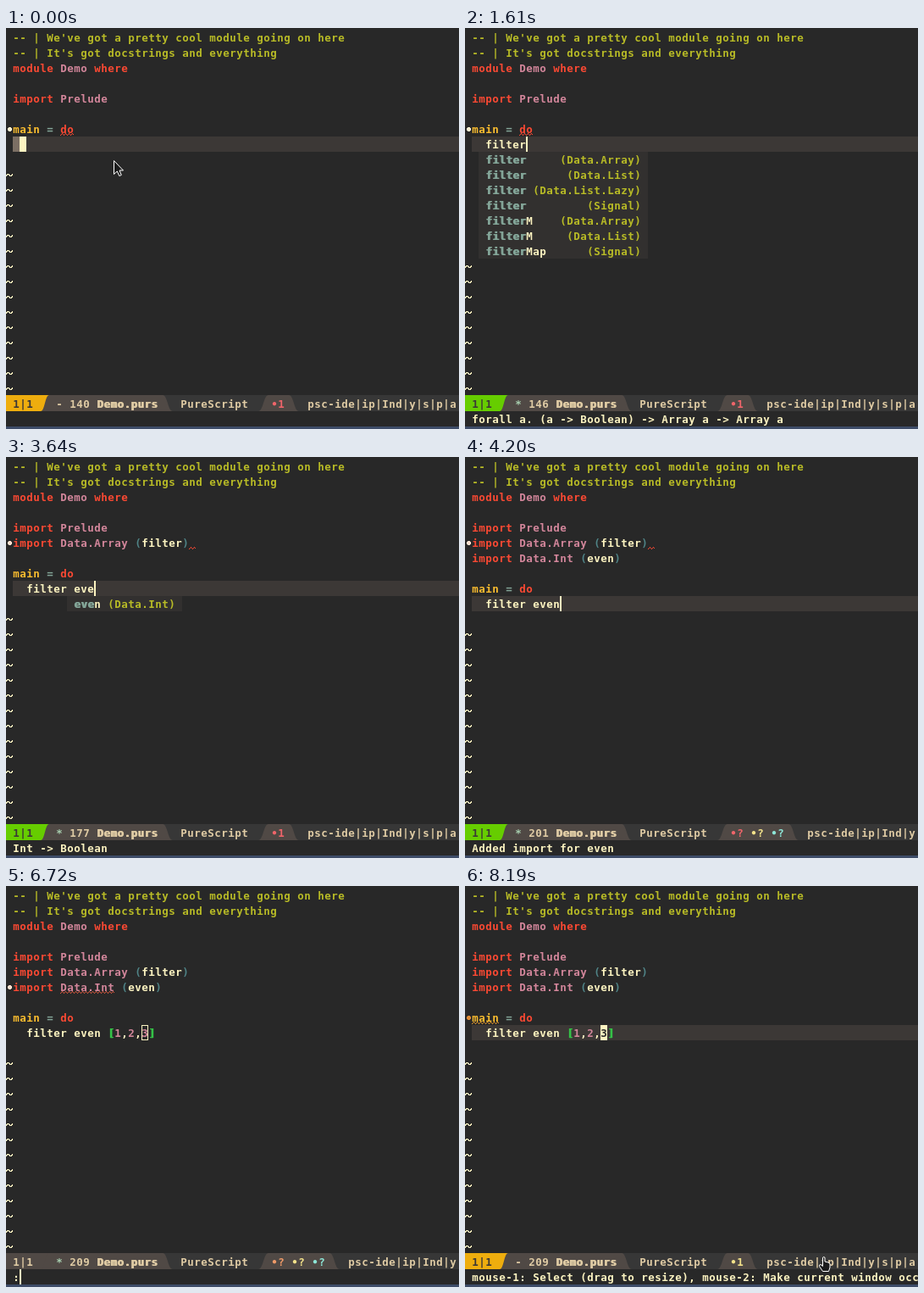
Animation of 535 by 473 pixels, one loop 8.26 s. Source, as an HTML page with a canvas:

```html
<!DOCTYPE html>
<html lang="en">
<head>
<meta charset="utf-8">
<title>Editor import completion</title>
<style>
  html, body { margin: 0; width: 100%; height: 100%; overflow: hidden; background: #282828; }
  canvas { display: block; }
</style>
</head>
<body>
<canvas id="stage" width="535" height="473"></canvas>
<script>
const ctx = document.getElementById('stage').getContext('2d');
const WIDTH = 535, HEIGHT = 473, LOOP = 8260;
const CELL = 8, LINE = 18, TOP = 2, CODE_X = 24;
const MODE_Y = 434, ECHO_Y = 452;

const C = {
  bg: '#282828', line: '#3c3836', popup: '#32302f', bar: '#373737', segment: '#504945',
  cream: '#fdf4c1', comment: '#b8bb26', keyword: '#fb4933', type: '#d3869b',
  name: '#fabd2f', operator: '#83a598', paren: '#4f8386', tan: '#dfcba4',
  trailing: '#7c6f64', error: '#f0656a', alert: '#ee9a68', warning: '#f3e28a', info: '#8de6d7',
  normal: '#eead0e', insert: '#66cd00', inactive: '#504945', strip: '#3d4c68'
};

const importLines = [
  [['import ', C.keyword], ['Data.Array ', C.type], ['(', C.paren], ['filter', C.cream], [')', C.paren]],
  [['import ', C.keyword], ['Data.Int ', C.type], ['(', C.paren], ['even', C.cream], [')', C.paren]]
];
const lineLength = line => line.reduce((sum, [text]) => sum + text.length, 1);

const filterPopup = {
  column: 0, prefix: 'filter', width: 23,
  items: [['', 'Data.Array'], ['', 'Data.List'], ['', 'Data.List.Lazy'], ['', 'Signal'],
          ['M', 'Data.Array'], ['M', 'Data.List'], ['Map', 'Signal']]
};
const evenPopup = { column: 7, prefix: 'eve', width: 15, items: [['n', 'Data.Int']] };

// Each entry changes part of the editor state from its time on.
const type = (typed, at = typed.length) => ({ typed, at });
const timeline = [
  [0, { ...type('', -1), mode: 'normal', modified: false, echo: '', issue: 'do', checkColor: C.error,
        checking: false, imports: 0, popup: null, lit: false, prompt: false }],
  [350, { mode: 'insert', at: 0, echo: '-- INSERT --' }],
  [910, { ...type('f'), modified: true, echo: '' }],
  [1050, type('fi')],
  [1260, type('filt')],
  [1610, { ...type('filter'), popup: filterPopup, echo: 'forall a. (a -> Boolean) -> Array a -> Array a' }],
  [2030, { imports: 1, popup: null, checking: true, echo: 'Added import for filter' }],
  [2450, { checking: false, issue: 'filter' }],
  [2590, { ...type('filter '), echo: '' }],
  [2730, type('filter e')],
  [3150, type('filter ev')],
  [3290, type('filter eve')],
  [3640, { popup: evenPopup, echo: 'Int -> Boolean' }],
  [3710, { checking: true }],
  [4130, { ...type('filter even'), imports: 2, popup: null, echo: 'Added import for even' }],
  [4620, { checking: false, issue: 'int', echo: '' }],
  [5040, { ...type('filter even []', 13), lit: true }],
  [5180, type('filter even [1]', 14)],
  [5390, type('filter even [1,]', 15)],
  [5530, type('filter even [1,2]', 16)],
  [5810, type('filter even [1,2,]', 17)],
  [5880, type('filter even [1,2,3]', 18)],
  [6300, { mode: 'normal', at: 17 }],
  [6370, { checking: true, checkColor: C.alert }],
  [6580, { lit: false }],
  [6720, { prompt: true, echo: ':' }],
  [6860, { echo: ':w' }],
  [6930, { prompt: false, echo: '' }],
  [7000, { modified: false, echo: 'Wrote /home/quill/Documents/chromacannon/src/Demo.purs' }],
  [7700, { checking: false, issue: 'main' }],
  [8190, { echo: 'mouse-1: Select (drag to resize), mouse-2: Make current window occupy' }]
];
const stateAt = time => Object.assign({}, ...timeline.filter(([start]) => start <= time).map(([, change]) => change));

const rowY = row => TOP + row * LINE;

function rect(x, y, w, h, color) {
  ctx.fillStyle = color;
  ctx.fillRect(x, y, w, h);
}

ctx.font = 'bold 12.5px "DejaVu Sans Mono", monospace';
const spacing = CELL - ctx.measureText('0').width;
ctx.letterSpacing = `${spacing}px`;

function write(text, x, y, color) {
  ctx.fillStyle = color;
  ctx.fillText(text, x + spacing / 2, y + 14);
}

// Heavy text is struck twice, one pixel apart.
function overstrike(text, x, y, color) {
  write(text, x, y, color);
  write(text, x + 1, y, color);
}

function writeTokens(tokens, x, y) {
  for (const [text, color] of tokens) {
    write(text, x, y, color);
    x += text.length * CELL;
  }
}

function drawTilde(row) {
  [0x71, 0xdb, 0x8e].forEach((bits, dy) => {
    for (let x = 0; x < 8; x++) {
      if (bits & (128 >> x)) rect(x, rowY(row) + 8 + dy, 1, 1, C.cream);
    }
  });
}

function drawIssue({ issue, imports }) {
  const mainRow = 6 + imports;
  const [row, x, width, dot, color] = {
    do: [mainRow, 64, 16, '#fdf0d0', C.keyword],
    filter: [5, 216, 8, '#fcdfce', C.keyword],
    int: [6, 64, 64, '#fcdfce', '#d9573d'],
    main: [mainRow, 8, 32, '#dd8a35', '#e79a2b']
  }[issue];
  const y = rowY(row);
  rect(3, y + 7, 3, 5, dot);
  rect(2, y + 8, 5, 3, dot);
  for (let dx = 0; dx < width; dx++) rect(x + dx, y + 14 + Math.abs(2 - dx % 4), 1, 1, color);
}

function drawPopup({ column, prefix, width, items }, row) {
  const x = CODE_X + column * CELL;
  rect(x - CELL, rowY(row), (width + 2) * CELL, items.length * LINE, C.popup);
  items.forEach(([rest, module], i) => {
    const y = rowY(row + i), note = `(${module})`;
    overstrike(prefix, x, y, C.operator);
    write(rest, x + prefix.length * CELL, y, C.cream);
    write(note, x + (width - note.length) * CELL, y, C.comment);
  });
}

function drawCodeLine(state, y) {
  const x = CODE_X + state.at * CELL;
  const block = state.mode === 'normal';
  if (!state.prompt) rect(8, y, WIDTH - 8, LINE, C.line);
  if (block && !state.typed) rect(8, y, CELL, LINE, C.trailing);
  if (block && !state.prompt) rect(x, y, CELL, LINE, C.cream);
  [...state.typed].forEach((char, i) => {
    const charX = CODE_X + i * CELL;
    if ('[]'.includes(char)) {
      if (state.lit) rect(charX, y, CELL, LINE, '#5c5a50');
      overstrike(char, charX, y, state.lit ? '#14d986' : '#35c247');
      return;
    }
    const underCursor = block && !state.prompt && i === state.at;
    const color = /\d/.test(char) ? C.type : C.cream;
    write(char, charX, y, underCursor ? C.bg : color);
  });
  if (!block) rect(x, y, 2, LINE, C.cream);
  if (state.prompt) {
    ctx.strokeStyle = C.cream;
    ctx.lineWidth = 1;
    ctx.strokeRect(x + 0.5, y + 0.5, CELL - 1, LINE - 1);
  }
}

function drawBuffer(state) {
  const mainRow = 6 + state.imports, codeRow = mainRow + 1;
  const lines = [
    [['-- | We\'ve got a pretty cool module going on here', C.comment]],
    [['-- | It\'s got docstrings and everything', C.comment]],
    [['module ', C.keyword], ['Demo ', C.type], ['where', C.keyword]],
    [],
    [['import ', C.keyword], ['Prelude', C.type]],
    ...importLines.slice(0, state.imports),
    [],
    [['main ', C.name], ['= ', C.operator], ['do', C.keyword]]
  ];
  lines.forEach((tokens, row) => writeTokens(tokens, 8, rowY(row)));
  drawCodeLine(state, rowY(codeRow));
  const popupRows = state.popup ? state.popup.items.length : 1;
  for (let row = codeRow + 1 + popupRows; row < 24; row++) drawTilde(row);
  if (state.popup) drawPopup(state.popup, codeRow + 1);
  drawIssue(state);
}

// A segment whose sides are S-curves running from a top x to a bottom x.
function drawSegment(leftTop, leftBottom, rightTop, rightBottom, color) {
  const top = MODE_Y - 1, bottom = ECHO_Y;
  const left = (leftTop + leftBottom) / 2, right = (rightTop + rightBottom) / 2;
  ctx.beginPath();
  ctx.moveTo(leftTop, top);
  ctx.lineTo(rightTop, top);
  ctx.bezierCurveTo(right, top, right, bottom, rightBottom, bottom);
  ctx.lineTo(leftBottom, bottom);
  ctx.bezierCurveTo(left, bottom, left, top, leftTop, top);
  ctx.fillStyle = color;
  ctx.fill();
}

function drawModeline(state) {
  const added = importLines.slice(0, state.imports).reduce((sum, line) => sum + lineLength(line), 0);
  const shift = state.checking ? 6 * CELL : 0;
  rect(0, MODE_Y - 1, WIDTH, 19, C.bar);
  drawSegment(0, 0, 185, 197, C.segment);
  drawSegment(0, 0, 51, 41, state.prompt ? C.inactive : C[state.mode]);
  drawSegment(310, 298, 334 + shift, 346 + shift, C.segment);

  write('1|1', 8, MODE_Y, state.prompt ? C.tan : '#3c3836');
  write(state.modified ? '*' : '-', 59, MODE_Y, state.modified ? '#a9d0b0' : C.tan);
  write(String(140 + state.typed.length + added), 75, MODE_Y, C.tan);
  overstrike('Demo.purs', 107, MODE_Y, C.tan);
  write('PureScript', 206, MODE_Y, C.tan);
  if (state.checking) {
    [state.checkColor, C.warning, C.info].forEach((color, i) => write('•?', 313 + i * 3 * CELL, MODE_Y, color));
  } else {
    write('•1', 313, MODE_Y, state.issue === 'main' ? C.warning : C.error);
  }
  const minorModes = 'psc-ide|ip|Ind|y|s|p|a';
  write(state.checking ? minorModes.slice(0, 16) : minorModes, 356 + shift, MODE_Y, C.tan);
}

function drawEcho({ echo, prompt }) {
  write(echo, 8, ECHO_Y, C.cream);
  if (prompt) rect(8 + echo.length * CELL, ECHO_Y, 2, LINE, C.cream);
  rect(0, 470, WIDTH, 3, C.strip);
}

const arrow = new Path2D('M.5.5V16.5L4.3 13L6.8 18.5L9.3 17.4L7 12H11.5Z');
const hand = new Path2D('M4.5 9V2Q4.5.5 5.7.5T7 2V6L9 6.5L11 7L13 8.5V13L11.5 17.5H4.5L.5 11.5Q0 9.5 2 9.5L4.5 11.5Z');

function drawPointer(path, x, y) {
  ctx.save();
  ctx.translate(x, y);
  ctx.fillStyle = '#1c1c1c';
  ctx.strokeStyle = '#fff';
  ctx.lineWidth = 1;
  ctx.fill(path);
  ctx.stroke(path);
  ctx.restore();
}

function drawMouse(time) {
  if (time < 350) drawPointer(arrow, 127, 156);
  if (time < 7910) return;
  const progress = Math.min(4, Math.floor((time - 7910) / 70)) / 4;
  const x = 145 + 273 * progress, y = 223 + 214 * progress;
  drawPointer(progress === 1 ? hand : arrow, x, y);
}

function draw(now) {
  const time = now % LOOP;
  const state = stateAt(time);
  rect(0, 0, WIDTH, HEIGHT, C.bg);
  drawBuffer(state);
  drawModeline(state);
  drawEcho(state);
  drawMouse(time);
}

const start = performance.now();
function frame() {
  draw(performance.now() - start);
  requestAnimationFrame(frame);
}
frame();
</script>
</body>
</html>
```
